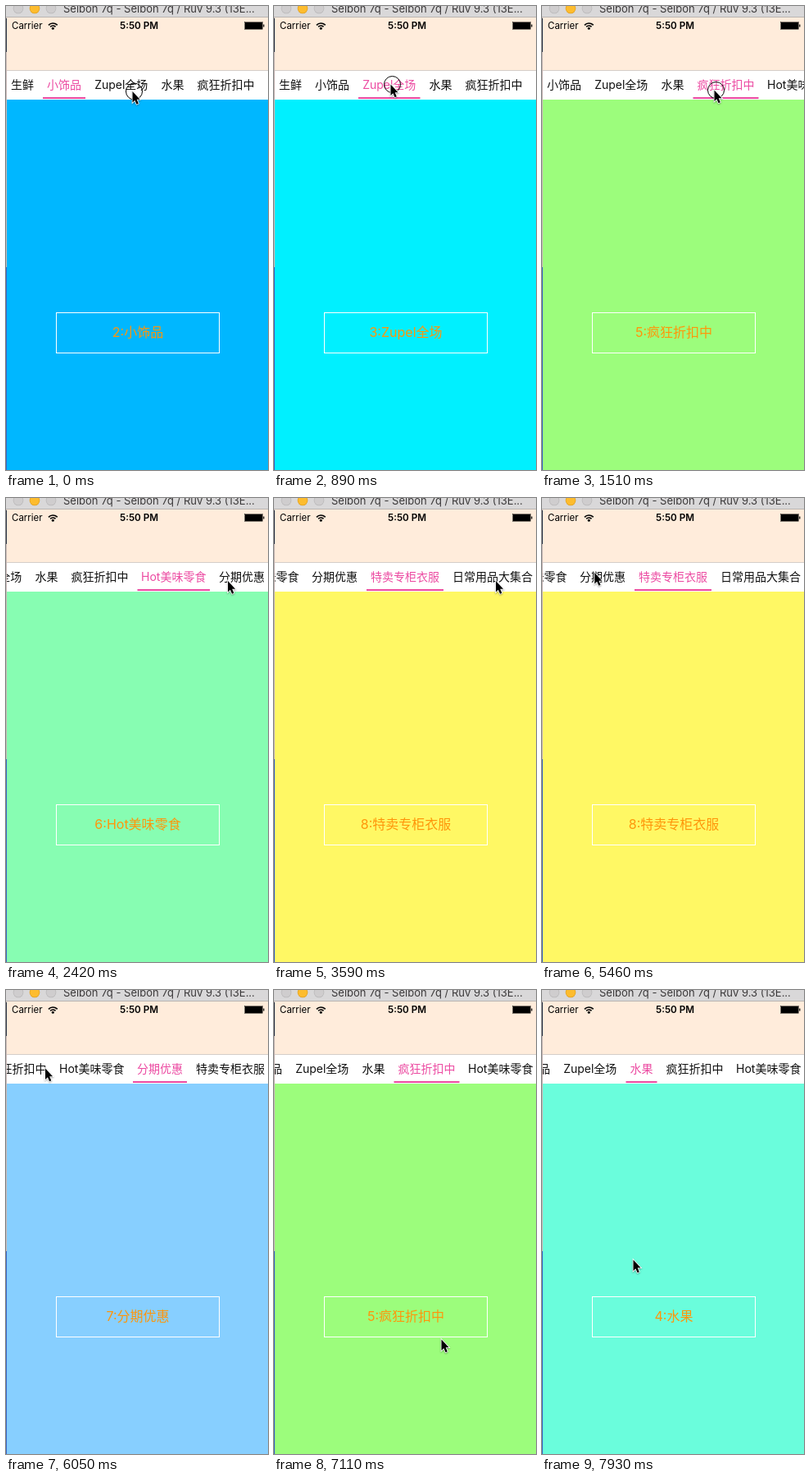
An HTML page with a canvas that plays this animation: 320x565 px, repeating every 7990 ms.

```html
<!DOCTYPE html>
<html lang="zh-CN">
<head>
<meta charset="utf-8">
<style>
  html, body { margin: 0; width: 100%; height: 100%; overflow: hidden; background: #fff; }
  canvas { display: block; width: 320px; height: 565px; }
</style>
</head>
<body>
<canvas id="stage" width="320" height="565"></canvas>
<script>
const ctx = document.getElementById('stage').getContext('2d');
const LOOP = 7990;
const FONT = 'Inter, "Noto Sans CJK SC", "Noto Sans CJK", sans-serif';
const PINK = '#ec4ba2';
const MARGIN = 6, GAP = 16, VIEW_RIGHT = 316;
const SCROLL_TIME = 270, TAP_TIME = 250, MOVE_TIME = 270;

const labels = ['生鲜', '小饰品', 'Zupel全场', '水果', '疯狂折扣中', 'Hot美味零食',
  '分期优惠', '特卖专柜衣服', '日常用品大集合', '母婴海外'];
const colors = ['#2daaff', '#00b7ff', '#00f0ff', '#6afddc', '#9cfd7c', '#87fdb2',
  '#87cfff', '#fff864', '#2daaff', '#87fdb2'];

// Lay the labels out in a row: full-width glyphs 14px, Latin letters about half
let edge = MARGIN;
const tabs = labels.map((label, i) => {
  const width = [...label].reduce((sum, c) => sum + (c < '\x7f' ? 7.5 : 14), 0);
  const tab = { label, width, left: edge, color: colors[i], number: i + 1 };
  edge += width + GAP;
  return tab;
});
const tabNumber = number => tabs[number - 1];

// Keep the next tab fully in view; near the start, align the previous one instead
function barOffset(number) {
  const next = tabNumber(number + 1);
  const overflow = next.left + next.width - VIEW_RIGHT;
  return overflow > 0 ? overflow : tabNumber(number - 1).left - MARGIN;
}

const taps = [
  { at: -190, tab: 2 }, { at: 890, tab: 3 }, { at: 1510, tab: 5 }, { at: 2140, tab: 6 },
  { at: 2710, tab: 7 }, { at: 3300, tab: 8 }, { at: 3940, tab: 9 }, { at: 5110, tab: 8 },
  { at: 5760, tab: 7 }, { at: 6230, tab: 5 }
];
const swipe = { at: 7470, release: 7620, settle: 7880, done: 7930, drag: 66, from: 5, to: 4 };
const choices = [...taps, { at: swipe.done, tab: swipe.to }];

// Each move ends at the given time
const moves = [
  { end: 0, x: 154, y: 103.5 }, { end: 720, x: 142, y: 95 }, { end: 1340, x: 210, y: 102 },
  { end: 1960, x: 270.5, y: 100.5 }, { end: 4460, x: 82, y: 81 }, { end: 4870, x: 87, y: 84 },
  { end: 5580, x: 47.5, y: 95 }, { end: 7110, x: 204, y: 425 }, { end: 7930, x: 111, y: 328 }
];

const clamp = v => Math.max(0, Math.min(1, v));
const progress = (t, from, to) => clamp((t - from) / (to - from));
const easeInOut = p => p * p * (3 - 2 * p);
const easeOut = p => 1 - (1 - p) ** 3;
const mix = (a, b, p) => a + (b - a) * p;

function rect(color, x, y, w, h) {
  ctx.fillStyle = color;
  ctx.fillRect(x, y, w, h);
}

function disc(color, x, y, r) {
  ctx.fillStyle = color;
  ctx.beginPath();
  ctx.arc(x, y, r, 0, 7);
  ctx.fill();
}

function text(string, x, y, size, color, align = 'center', weight = 400) {
  ctx.font = `${weight} ${size}px ${FONT}`;
  ctx.textAlign = align;
  ctx.fillStyle = color;
  ctx.fillText(string, x, y);
}

function clipped(x, y, w, h, draw) {
  ctx.save();
  ctx.beginPath();
  ctx.rect(x, y, w, h);
  ctx.clip();
  draw();
  ctx.restore();
}

function drawWifi(x, y) {
  ctx.strokeStyle = '#000';
  ctx.lineWidth = 1.7;
  for (const r of [4.3, 7.3]) {
    ctx.beginPath();
    ctx.arc(x, y, r, -Math.PI * 0.76, -Math.PI * 0.24);
    ctx.stroke();
  }
  disc('#000', x, y - 1, 1.5);
}

function drawHeader() {
  // A sliver of desktop shows along the left edge
  rect('#c9b8b6', 0, 0, 1, 565);
  rect('#2b3347', 0, 15, 1, 41);
  rect('#3a63c4', 0, 318, 1, 247);

  rect('#d9d8d9', 0, 0, 320, 13);
  rect('#b9b5b3', 0, 13, 320, 1);
  ['#cfcdce', '#fdbc2e', '#cfcdce'].forEach((color, i) => {
    disc(i === 1 ? '#dfa023' : '#b9b7b8', 15 + i * 20, 3, 6.3);
    disc(color, 15 + i * 20, 3, 5.6);
  });
  text('Selbon 7q - Selbon 7q / Ruv 9.3 (13E...', 70, 8, 13, '#3c3a3b', 'left');

  rect('#ffecdb', 1, 14, 319, 64);
  text('Carrier', 7, 28, 11.5, '#000', 'left');
  drawWifi(57.3, 28.3);
  text('5:50 PM', 162.5, 28, 11.7, '#000', 'center', 600);
  ctx.strokeStyle = '#000';
  ctx.lineWidth = 0.5;
  ctx.strokeRect(291.5, 19.5, 22, 9);
  rect('#000', 292, 20, 21, 8);
  rect('#000', 314.2, 22.5, 1.2, 3);
}

function drawTabs(selected, offset) {
  rect('#fff', 1, 78, 319, 36);
  rect('#d4cdc9', 1, 78, 319, 1);
  clipped(1, 79, 319, 35, () => {
    for (const { label, left, width, number } of tabs) {
      const x = left - offset;
      const active = number === selected;
      text(label, x + width / 2, 101, 14, active ? PINK : '#111');
      if (active) rect(PINK, x - 5, 111, width + 10, 2);
    }
  });
}

function drawPage(number, x) {
  const { label, color } = tabNumber(number);
  rect(color, x, 114, 320, 451);
  ctx.strokeStyle = '#fff';
  ctx.lineWidth = 1;
  ctx.strokeRect(x + 60.5, 373.5, 199, 49);
  text(`${number}:${label}`, x + 160, 403, 16, '#ff950a');
}

function swipeShift(t) {
  return t < swipe.release
    ? swipe.drag * progress(t, swipe.at, swipe.release)
    : mix(swipe.drag, 320, easeOut(progress(t, swipe.release, swipe.settle)));
}

function drawPointer(t) {
  const dragging = t >= swipe.at && t < swipe.release;
  const tapped = taps.some(({ at }) => t >= at && t < at + TAP_TIME);
  let { x, y } = moves[0];
  for (const move of moves) {
    const p = easeInOut(progress(t, move.end - MOVE_TIME, move.end));
    x = mix(x, move.x, p);
    y = mix(y, move.y, p);
  }
  if (dragging) x += swipeShift(t);

  ctx.save();
  ctx.translate(x, y);
  if (tapped || dragging) {
    ctx.strokeStyle = '#000';
    ctx.lineWidth = 1;
    ctx.beginPath();
    ctx.arc(2.5, 0.5, 10, 0, 7);
    ctx.stroke();
  }
  const arrow = new Path2D('M.5 .5V14L3.4 11.2L5.6 16.2L7.8 15.2L5.7 10.3H9.6Z');
  ctx.shadowColor = 'rgba(0,0,0,.35)';
  ctx.shadowBlur = 2;
  ctx.shadowOffsetY = 1;
  ctx.strokeStyle = '#fff';
  ctx.lineWidth = 1.6;
  ctx.stroke(arrow);
  ctx.shadowColor = 'transparent';
  ctx.fillStyle = '#000';
  ctx.fill(arrow);
  ctx.restore();
}

function draw(t) {
  const index = choices.findLastIndex(({ at }) => t >= at);
  const { at, tab } = choices[index];
  const offset = barOffset(tab);
  const previous = index ? barOffset(choices[index - 1].tab) : offset;

  drawHeader();
  drawTabs(tab, mix(previous, offset, easeInOut(progress(t, at, at + SCROLL_TIME))));
  clipped(1, 114, 319, 451, () => {
    if (t >= swipe.at) {
      const x = 1 + swipeShift(t);
      drawPage(swipe.to, x - 320);
      drawPage(swipe.from, x);
    } else {
      drawPage(tab, 1);
    }
  });
  drawPointer(t);
}

const began = performance.now();
function tick() {
  draw((performance.now() - began) % LOOP);
  requestAnimationFrame(tick);
}
tick();
</script>
</body>
</html>
```
